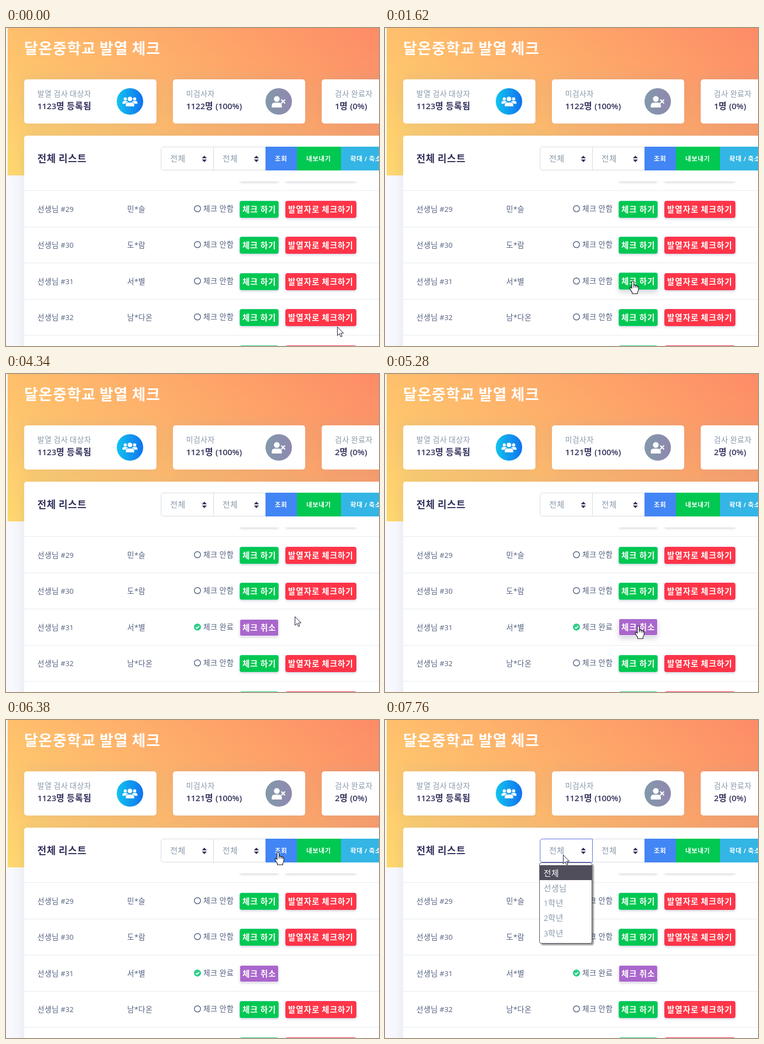
An HTML page for the animation above (8000 ms loop, 677 px wide and 576 px high).

```html
<!DOCTYPE html>
<html lang="ko">
<head>
<meta charset="utf-8">
<title>발열 체크</title>
<style>
  html, body { margin: 0; width: 100%; height: 100%; overflow: hidden; background: #f8f9fe; }
  svg { display: block; width: 677px; height: 576px; }
  text { font-family: "Open Sans", "Noto Sans CJK KR", "Noto Sans CJK", sans-serif; white-space: pre; }
  .panel { filter: drop-shadow(0 0 13px rgba(136, 152, 170, .2)); }
  .popup { filter: drop-shadow(3px 3px 1px rgba(0, 0, 0, .4)); }
</style>
</head>
<body>
<svg id="stage" viewBox="0 0 677 576" xmlns="http://www.w3.org/2000/svg"></svg>
<script>
const LOOP = 8000, RELOAD = 3310, READY = 4340, CURSOR_FREE = 4190;
const FOCUS = 7600, POPUP = 7690;
const INK = '#32325d', BODY = '#525f7f', MUTED = '#8898aa', BORDER = '#d6dbe1';
const GREEN = { fill: '#00c851', edge: '#2dce89' };
const RED = { fill: '#ff3547', edge: '#f5365c' };
const PURPLE = { fill: '#aa66cc', edge: '#f4f5f7' };

// Hangul syllables are set one em apart; other characters keep their own widths.
function text(x, y, str, size, fill, weight = 400, track = 0) {
  const runs = str.split(/([가-힣]+)/).filter(Boolean).map(run =>
    /[가-힣]/.test(run)
      ? `<tspan font-size="${size * 1.04}" letter-spacing="${size * .043 + track}">${run}</tspan>`
      : `<tspan letter-spacing="${track}">${run}</tspan>`);
  return `<text x="${x}" y="${y}" font-size="${size}" font-weight="${weight}" fill="${fill}">${runs.join('')}</text>`;
}

const rect = (x, y, w, h, fill, more = '') =>
  `<rect x="${x}" y="${y}" width="${w}" height="${h}" fill="${fill}" ${more}/>`;

const group = (id, body) => `<g id="${id}">${body}</g>`;

const buttons = [];
function button(x, y, w, label, tone, page) {
  const id = 'b' + buttons.length;
  buttons.push({ id, x, y, w, h: 31, page });
  return group(id, rect(x + .5, y + .5, w - 1, 30, tone.fill, `rx="3" stroke="${tone.edge}"`) +
    text(x + 5, y + 20.5, label, 14, '#fff', 700, .35));
}

const ring = (x, y) => `<circle cx="${x}" cy="${y}" r="5.6" fill="none" stroke="${BODY}" stroke-width="1.4"/>`;
const tick = (x, y) => `<circle cx="${x}" cy="${y}" r="6.4" fill="#2dce89"/>
  <path d="M${x - 3} ${y + .2}l2.2 2.2 4-4.2" fill="none" stroke="#fff" stroke-width="1.7"/>`;

const layouts = {
  list: { name: 220, state: 358, button: 424, rings: true },
  top: { name: 225, state: 349, button: 416, rings: false }
};

function row(layout, top, number, name, page, done) {
  const at = layouts[layout], y = Math.floor(top), mark = done ? tick : ring;
  return rect(33, Math.floor(top - 18.5), 644, 1, '#e9ecef') +
    text(57, y + 20, '선생님 #' + number, 13, BODY) +
    text(at.name, y + 20, name, 13, BODY) +
    (at.rings ? mark(347.5, y + 14.3) : '') +
    text(at.state, y + 18.7, done ? '체크 완료' : '체크 안함', 13, BODY) +
    (done
      ? button(at.button, y, 71, '체크 취소', PURPLE, page)
      : button(at.button, y, 71, '체크 하기', GREEN, page) +
        button(at.button + 83, y, 129, '발열자로 체크하기', RED, page));
}

const PITCH = 65.5;
const listNames = ['', '민*슬', '도*람', '서*별', '남*다온', ''];
const topNames = ['구*솔', '변*음', '마*루', '노*울'];

const listRows = (page, doneRow) => listNames.map((name, i) =>
  row('list', 313 + PITCH * (i - 1), 28 + i, name, page, 28 + i === doneRow)).join('');

const topRows = () =>
  [[57, '학년/반/번호'], [225, '이름'], [349, '체크여부']]
    .map(([x, s]) => text(x, 302, s, 10, BODY, 700, 1)).join('') +
  topNames.map((name, i) => row('top', 336.5 + PITCH * i, i + 1, name, 1, false)).join('');

const statCard = (x, label) =>
  rect(x, 93, 240, 80, '#fff', 'rx="5" class="panel"') + text(x + 24, 123.5, label, 13, MUTED);

const statValue = (x, str) => text(x, 146.5, str, 15, INK, 600);
const statValues = (left, done) => statValue(327, left) + statValue(597, done);

const person = (x, y, r) => `<circle cx="${x}" cy="${y}" r="${r}"/>
  <path d="M${x - r * 1.75} ${y + r * 3}v-${r * .7}q0-${r} ${r * 1.1}-${r}h${r * 1.3}q${r * 1.1} 0 ${r * 1.1} ${r}v${r * .7}z"/>`;

const icons = `<g fill="#fff">
  ${person(216.5, 128.5, 2.9)}${person(233.5, 128.5, 2.9)}
  <g stroke="#1c9cec">${person(225, 128.5, 4.6)}</g>
  ${person(491.5, 128.5, 5.2)}
  <path d="M499.5 129.5l7 7m0-7l-7 7" stroke="#fff" stroke-width="2.2"/></g>`;

const carets = x => `<path fill="${INK}" d="M${x - 4.5} 236l4.5-4.8 4.5 4.8zM${x - 4.5} 238.2l4.5 4.8 4.5-4.8z"/>`;

const tool = (x, w, label, fill) =>
  rect(x, 215, w, 43, fill) + text(x + 17, 241, label, 11, '#fff', 700, .28);

const selectBox = (right, more) =>
  `<path d="M${right} 215.5H286.5q-5 0-5 5v32q0 5 5 5H${right}z" ${more}/>`;

const toolbar = selectBox(471.5, `fill="#fff" stroke="${BORDER}"`) +
  rect(376, 216, 1, 41, BORDER) +
  text(298, 242, '전체', 14, MUTED) + carets(360) +
  text(393, 242, '전체', 14, MUTED) + carets(454.5) +
  tool(471, 57, '조회', '#4285f4') + tool(528, 80, '내보내기', GREEN.fill) +
  tool(608, 90, '확대 / 축소', '#33b5e5');

const options = ['전체', '선생님', '1학년', '2학년', '3학년'];
const popup = `<g class="popup">${rect(280.5, 258.5, 95, 146, '#fff', 'rx="3" stroke="#55535f"')}</g>` +
  rect(281, 263, 94, 27, '#514e5c') +
  options.map((s, i) => text(288, 282.5 + 27.3 * i, s, 14, i ? MUTED : '#fff')).join('');

const arrow = '<path d="M.5 .5V16.2L4.2 12.8 6.6 18.3 9 17.3 6.6 11.9H11.6Z" fill="#fff" stroke="#22223f"/>';
const hand = `<g fill="#fff" stroke="#15151f" stroke-width="1.1" stroke-linejoin="round">
  <path d="M-2 2Q-2 .3-.2 .3T1.6 2V8Q3.8 6.8 5 8.6 7 7.8 8 9.6 10.2 9.2 10.2 11.8V15.5Q10.2 18.5 8.4 20.5V23.3H-1.4V20.8Q-4 17.5-5.6 14-5.8 11.5-4 11.6L-2 13.6Z"/>
  <path d="M1.6 8v4M5 8.6v3.6M8 9.6v3" fill="none"/></g>`;

const gradient = (id, coords, a, b) => `<linearGradient id="${id}" ${coords}>
  <stop stop-color="${a}"/><stop offset="1" stop-color="${b}"/></linearGradient>`;

const stage = document.getElementById('stage');
stage.innerHTML = `<defs>
    ${gradient('peach', 'gradientUnits="userSpaceOnUse" x1="3" y1="267" x2="633" y2="-484"', '#ffd86f', '#fc6262')}
    ${gradient('blue', 'x2="1"', '#11c4ef', '#1171ef')}
    ${gradient('slate', 'x2="1"', '#8299aa', '#8f88af')}
  </defs>` +
  rect(0, 0, 677, 576, '#f8f9fe') +
  rect(3, 0, 674, 267, 'url(#peach)') +
  text(33, 47, '달온중학교 발열 체크', 26, '#fff', 700) +
  statCard(33, '발열 검사 대상자') + statCard(303, '미검사자') + statCard(573, '검사 완료자') +
  statValue(57, '1123명 등록됨') +
  group('before', statValues('1122명 (100%)', '1명 (0%)')) +
  group('after', statValues('1121명 (100%)', '2명 (0%)')) +
  '<circle cx="225" cy="133" r="24" fill="url(#blue)"/><circle cx="495" cy="133" r="24" fill="url(#slate)"/>' +
  group('icons', icons) +
  rect(33, 195, 700, 420, '#fff', 'rx="5" class="panel"') +
  group('page0', listRows(0, 0)) + group('page1', topRows()) + group('page2', listRows(2, 31)) +
  rect(33, 195, 700, 83, '#fff', 'rx="5"') +
  text(57, 243, '전체 리스트', 17, INK, 600) + toolbar +
  group('focus', selectBox(376.5, 'fill="none" stroke="#5e72e4"')) +
  group('popup', popup) + group('arrow', arrow) + group('hand', hand);

// Pointer hot spot: time, x, y
const path = [
  [0, 601, 541], [60, 601, 541], [830, 486, 451], [1620, 450, 458], [3740, 450, 458],
  [4020, 510, 429], [4189, 510, 429], [4190, 511, 437], [4339, 511, 437], [4340, 524, 439],
  [4410, 524, 439], [5110, 463, 455], [5280, 460, 456], [5340, 460, 456], [6080, 551, 226],
  [6140, 549, 230], [6380, 494, 239], [6730, 494, 239], [7550, 323, 244], [LOOP, 323, 244]
];

function pointer(t) {
  const i = Math.max(1, path.findIndex(p => p[0] >= t));
  const [t0, x0, y0] = path[i - 1], [t1, x1, y1] = path[i];
  const k = Math.min(1, Math.max(0, (t - t0) / (t1 - t0))), e = k * k * (3 - 2 * k);
  return { x: x0 + (x1 - x0) * e, y: y0 + (y1 - y0) * e };
}

const pageAt = t => t < RELOAD ? 0 : t < READY ? 1 : 2;
const inside = (p, b) => p.x >= b.x && p.x <= b.x + b.w && p.y >= b.y && p.y <= b.y + b.h;
const tools = { x: 471, y: 215, w: 206, h: 43 };

function over(b, t) {
  return t >= 0 && b.page !== 1 && b.page === pageAt(t) && inside(pointer(t), b);
}

// Hover rises and falls linearly over 150 ms.
function lift(b, t) {
  let n = 0;
  for (let i = 0; i < 10; i++) n += over(b, t - i * 15);
  return n / 10;
}

const el = id => document.getElementById(id);
const show = (id, on) => { el(id).style.display = on ? '' : 'none'; };

function draw(t) {
  const page = pageAt(t), p = pointer(t);
  for (let i = 0; i < 3; i++) show('page' + i, i === page);
  show('before', page === 0);
  show('after', page > 0);
  show('icons', page !== 1);

  for (const b of buttons) {
    if (b.page !== page) continue;
    const k = lift(b, t), s = el(b.id).style;
    s.transform = `translateY(${-k}px)`;
    s.filter = `drop-shadow(0 ${2 + 3 * k}px ${2 + 3 * k}px rgba(50,50,93,.2))`;
  }

  const busy = t >= RELOAD && t < CURSOR_FREE;
  const pointing = busy || inside(p, tools) || buttons.some(b => over(b, t));
  const place = `translate(${Math.round(p.x)} ${Math.round(p.y)})`;
  for (const id of ['arrow', 'hand']) {
    show(id, (id === 'hand') === pointing);
    el(id).setAttribute('transform', place);
  }

  el('focus').style.opacity = Math.min(1, Math.max(0, (t - FOCUS) / 150));
  show('popup', t >= POPUP);
}

const start = performance.now();
function frame() {
  draw((performance.now() - start) % LOOP);
  requestAnimationFrame(frame);
}
frame();
</script>
</body>
</html>
```
